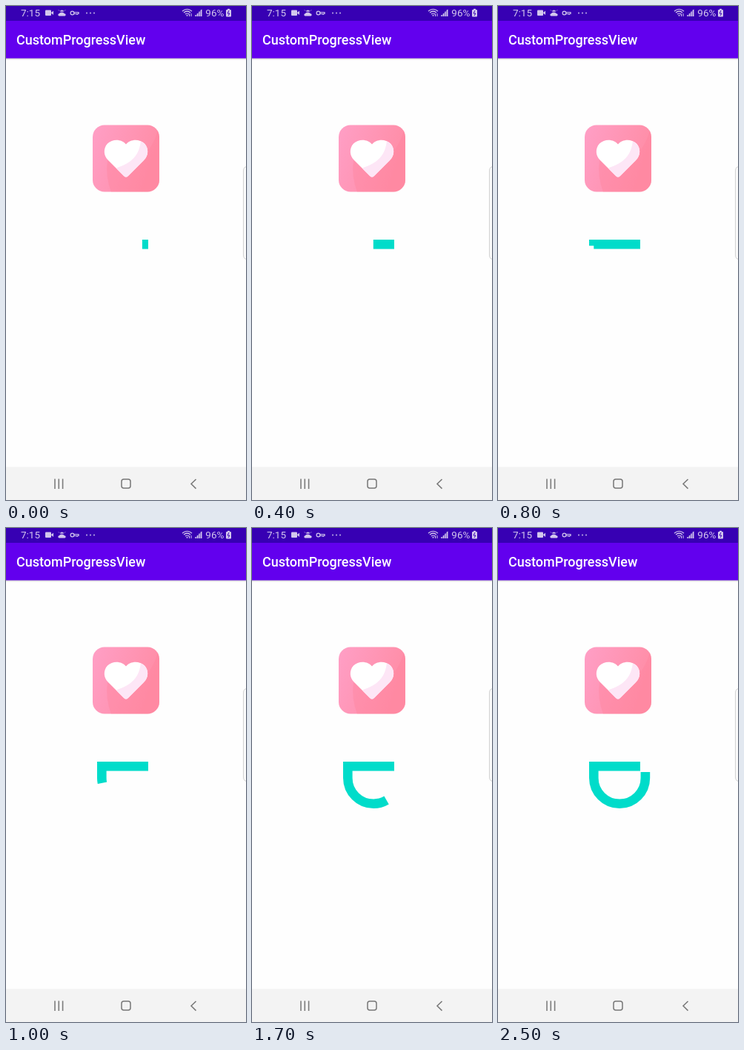
Recreate the animation shown at these times as an HTML page. Size 324x666 px, loop 2.6 s.

```html
<!DOCTYPE html>
<html lang="en">
<head>
<meta charset="utf-8">
<title>Progress view</title>
<style>
  html, body { margin: 0; width: 100%; height: 100%; overflow: hidden; background: #fefefe; }
  svg { display: block; width: 324px; height: 666px; }
  text { font-family: Roboto, "Noto Sans", sans-serif; }
</style>
</head>
<body>
<svg viewBox="0 0 324 666">
  <defs>
    <linearGradient id="card" x1="0" y1="0" x2="1" y2="0.35">
      <stop offset="0" stop-color="#ff9fc6"/>
      <stop offset="1" stop-color="#ff8da6"/>
    </linearGradient>
    <linearGradient id="shadow" x1="0" y1="0" x2="0" y2="1">
      <stop offset="0" stop-color="#000" stop-opacity=".22"/>
      <stop offset="1" stop-color="#000" stop-opacity="0"/>
    </linearGradient>
    <clipPath id="cardClip"><rect x="117" y="160.5" width="90" height="90" rx="16"/></clipPath>
    <clipPath id="heartClip"><path id="heart" d="M162 186.500C156.500 179.300 144 178.500 137 185.500C131 192 131.500 202 138 208L159 229Q162 232 165 229L186 208C192.500 202 193 192 187 185.500C180 178.500 167.500 179.300 162 186.500Z"/></clipPath>
  </defs>

  <rect width="324" height="666" fill="#fefefe"/>
  <rect y="70" width="324" height="3" fill="url(#shadow)"/>
  <rect y="20" width="324" height="50.500" fill="#6200ee"/>
  <rect width="324" height="20" fill="#3700b3"/>
  <text x="14" y="52" font-size="18" font-weight="500" fill="#fff">CustomProgressView</text>

  <!-- status bar -->
  <g fill="#d3c8ed">
    <text x="20" y="14" font-size="13.5">7:15</text>
    <text x="269.300" y="14" font-size="13.5">96%</text>
    <rect x="53" y="5.500" width="8" height="7.500" rx="1"/>
    <path d="M61 9L64 6.500V12L61 9.500Z"/>
    <path d="M71.500 13.500a1.700 1.700 0 0 1 .2-3.300a3.800 2.600 0 0 1 7.200 0a1.700 1.700 0 0 1 .6 3.300Z"/>
    <path d="M73 7.500a2.500 2 0 0 1 5 0Z"/>
    <path d="M71 5.500L72 6.500M80 5.500L79 6.500" stroke="#d3c8ed"/>
    <circle cx="109" cy="9.500" r=".9"/><circle cx="114" cy="9.500" r=".9"/><circle cx="119" cy="9.500" r=".9"/>
    <path d="M255 14L265 4V14Z" opacity=".4"/>
    <path d="M256 14V12M258.500 14V10M261 14V7.500M263.500 14V5" stroke="#d3c8ed" stroke-width="1.300"/>
    <rect x="297" y="5" width="7" height="9.500" rx="1"/><rect x="299" y="3.800" width="3" height="2"/>
  </g>
  <path d="M301 6L299 10H302L300 13" fill="none" stroke="#3700b3"/>
  <g fill="none" stroke="#d3c8ed" stroke-width="1.200">
    <circle cx="89.500" cy="9.500" r="2.400"/>
    <path d="M92 8.500H98V10.500H92M96 10.500V12"/>
    <path d="M238 7Q244.500 1.500 251 7M240 9Q244.500 5 249 9M242 11Q244.500 9 247 11"/>
    <path d="M247.500 14V10.500M250 10V14" stroke-width="1"/>
  </g>
  <circle cx="244.500" cy="12.800" r="1" fill="#d3c8ed"/>

  <!-- heart card -->
  <g clip-path="url(#cardClip)">
    <rect x="117" y="160" width="90" height="91" fill="url(#card)"/>
    <path d="M207 160C196 208 168 218 137 208Q134 230 142 251H207Z" fill="#ff839b" opacity=".4"/>
  </g>
  <use href="#heart" fill="#fff"/>
  <path d="M182 180C181 201 169 212 150 218V235H195V180Z" fill="#fde6f6" clip-path="url(#heartClip)"/>

  <path id="bar" fill="none" stroke="#00dcca" stroke-width="12.600"
        d="M192 321.300H129.300V337A34.800 34.800 0 0 0 198.900 337V328"/>

  <!-- edge handle -->
  <path d="M325 216.500Q320.500 217 320.500 222V336Q320.500 341 325 341.500" fill="#fafafa" stroke="#d2d2d2"/>

  <!-- navigation bar -->
  <rect y="621.500" width="324" height="45" fill="#f3f3f3"/>
  <g fill="none" stroke="#777" stroke-width="1.500">
    <path d="M66 637.500V651M71.300 637.500V651M76.600 637.500V651"/>
    <rect x="156" y="638" width="12" height="12" rx="3"/>
    <path d="M256.500 638L250 644.300L256.500 650.600"/>
  </g>
</svg>
<script>
  const LOOP = 2600, STEP = 100, LENGTH = 197;
  const bar = document.getElementById("bar");
  // [time in ms, animator fraction]
  const keys = [[0, .13], [400, .247], [600, .319], [1000, .457], [1700, .68], [2100, .806], [2500, .945]];

  function fraction(t) {
    const i = Math.max(1, keys.findIndex(k => k[0] >= t));
    const [t0, a] = keys[i - 1], [t1, b] = keys[i];
    return a + (b - a) * (t - t0) / (t1 - t0);
  }

  const ease = p => (1 - Math.cos(Math.PI * p)) / 2;

  function draw(ms) {
    const t = Math.floor(ms % LOOP / STEP) * STEP;
    bar.setAttribute("stroke-dasharray", (LENGTH * ease(fraction(t))).toFixed(2) + " 999");
  }

  const start = performance.now();
  function tick() {
    draw(performance.now() - start);
    requestAnimationFrame(tick);
  }
  tick();
</script>
</body>
</html>
```
